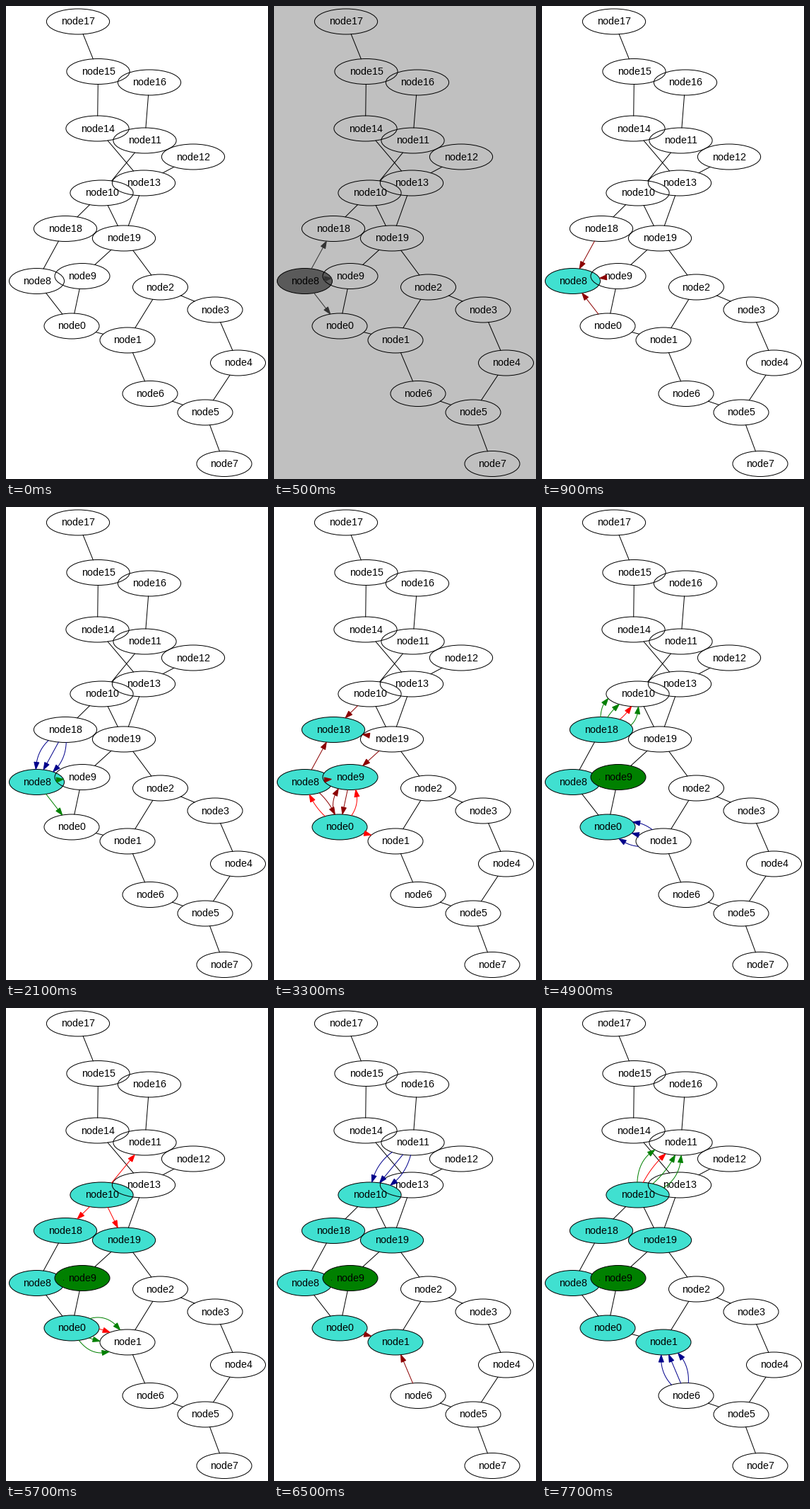
Write a matplotlib script that moves like this. It is 371 by 668 pixels and loops after 8 s.

```python
import numpy as np
import matplotlib.pyplot as plt
from matplotlib.animation import FuncAnimation
from matplotlib.patches import Ellipse, Polygon

W, H, DPI = 371, 668, 100
TICK = 100
PX = 72 / DPI
FAN = 22          # spacing between parallel messages on one link
HEAD, HALF = 10, 3.5

NODES = [(93, 452), (172, 472), (218.5, 397), (296, 429), (328.5, 504),
         (282, 574), (204, 547.5), (309, 646.5), (43.5, 388.5), (108, 381.5),
         (135.5, 264), (196.5, 190), (265, 213), (195, 250), (129.5, 173),
         (130.5, 92.5), (203, 108), (102, 22), (84, 314.5), (167, 328)]
NODES = [np.array(p, float) for p in NODES]
LINKS = [(15, 17), (14, 15), (13, 14), (11, 16), (10, 11), (12, 13), (10, 18),
         (10, 19), (13, 19), (8, 18), (8, 9), (0, 8), (0, 9), (9, 19),
         (18, 19), (2, 19), (1, 2), (2, 3), (3, 4), (4, 5), (5, 6), (5, 7),
         (1, 6), (0, 1)]

TURQUOISE, GREEN, RED = "#40e0d0", "#008000", "#ff0000"
DARKRED, NAVY, SHADE = "#8b0000", "#00008b", "#333333"
REACHED = {8: 2, 9: 7, 18: 7, 0: 8, 10: 13, 19: 14, 1: 15}
FINISHED = {9: 10}


def push(color, node, *others):
    return [(node, other, color) for other in others]


def pull(color, node, *others):
    return [(other, node, color) for other in others]


def burst(src, dst, *colors):
    return [(src, dst, color) for color in colors]


def ask(src, dst):
    return burst(src, dst, NAVY, NAVY, NAVY)


STEPS = [
    [],
    push(SHADE, 8, 18, 9, 0),
    pull(DARKRED, 8, 18, 9, 0),
    ask(18, 8) + ask(0, 8) + pull(NAVY, 8, 9),
    push(RED, 8, 18, 9, 0),
    ask(18, 8) + push(GREEN, 8, 9, 0),
    burst(8, 18, GREEN, RED, GREEN, GREEN) + push(GREEN, 8, 9),
    pull(DARKRED, 9, 8, 0, 19) + pull(DARKRED, 18, 8, 10, 19),
    pull(DARKRED, 9, 8, 0, 19) + pull(DARKRED, 18, 8, 10, 19)
    + push(RED, 0, 8) + pull(DARKRED, 0, 8, 9) + push(RED, 0, 9, 1),
    push(RED, 18, 10, 19) + push(RED, 9, 0, 19),
    ask(10, 18),
    ask(10, 18) + ask(1, 0),
    burst(18, 10, GREEN, GREEN, RED, GREEN) + ask(1, 0),
    pull(DARKRED, 10, 11, 18, 19),
    push(RED, 10, 11, 18, 19) + burst(0, 1, GREEN, GREEN, RED, GREEN),
    pull(DARKRED, 1, 0, 6),
    pull(DARKRED, 1, 0, 6) + ask(11, 10),
    push(RED, 1, 2, 6),
    pull(DARKRED, 19, 13, 2) + push(RED, 1, 6),
    ask(6, 1) + burst(10, 11, GREEN, RED, GREEN, GREEN),
]


def radii(i):
    return np.array([39 if i < 10 else 44.6, 18])


def rim(i, j):
    """Point on the outline of node i facing node j, and its fraction of the way."""
    way = NODES[j] - NODES[i]
    t = 1 / np.hypot(*(way / radii(i)))
    return NODES[i] + t * way, t


def overlapping(i, j):
    return rim(i, j)[1] + rim(j, i)[1] > 1


def route(src, dst, offset=0):
    """Bezier between two node centres, clipped to the outside of both."""
    p, q = NODES[src], NODES[dst]
    way = q - p
    side = np.array([-way[1], way[0]]) / np.hypot(*way)
    if side[0] < 0:
        side = -side
    t = np.linspace(0, 1, 600)[:, None]
    path = p + t * way + 3 * t * (1 - t) * offset * side
    outside = np.ones(len(t), bool)
    for i in (src, dst):
        outside &= np.hypot(*((path - NODES[i]) / radii(i)).T) >= 1
    return path[outside]


def line(path, color, z=30):
    ax.plot(*np.transpose(path), color=color, lw=PX, zorder=z)


def dot(point):
    ax.plot(*point, ".", color="black", ms=1.6 * PX, mew=0, zorder=30)


def arrow(src, dst, offset, color):
    if overlapping(src, dst):
        low, high = sorted((src, dst))
        tip = rim(low, high)[0]
        way = NODES[dst] - NODES[src]
    else:
        path = route(src, dst, offset)
        tip = path[-1]
        shaft = path[np.hypot(*(path - tip).T) >= HEAD]
        way = tip - (shaft[-1] if len(shaft) else path[0])
        line(shaft, color)
    way = way / np.hypot(*way)
    base = tip - HEAD * way
    wing = HALF * np.array([-way[1], way[0]])
    ax.add_patch(Polygon([tip, base + wing, base - wing], fc=color, ec=color,
                         lw=PX, zorder=31))


def draw_node(i, step):
    fill = "none"
    if i in FINISHED and step >= FINISHED[i]:
        fill = GREEN
    elif i in REACHED and step >= REACHED[i]:
        fill = TURQUOISE
    elif i == 8 and step == 1:
        fill = "#5a5a5a"
    x, y = NODES[i]
    ax.add_patch(Ellipse((x, y), *(2 * radii(i)), fc=fill, ec="black",
                         lw=PX, zorder=i + 1))
    ax.text(x, y + 4.5, f"node{i}", ha="center", va="baseline",
            family="Liberation Sans", size=14.3 * PX, zorder=i + 1)


def draw_scene(step):
    ax.clear()
    ax.set(xlim=(0, W), ylim=(H, 0))
    ax.axis("off")
    fig.set_facecolor("#c0c0c0" if step == 1 else "white")
    for i in range(len(NODES)):
        draw_node(i, step)
    for link in LINKS:
        messages = [m for m in STEPS[step] if tuple(sorted(m[:2])) == link]
        for k, (src, dst, color) in enumerate(messages):
            arrow(src, dst, FAN * (k - (len(messages) - 1) / 2), color)
        if not messages:
            if overlapping(*link):
                dot(rim(*link)[0])
            else:
                line(route(*link)[[0, -1]], "black")


def update(frame):
    time = frame * TICK
    draw_scene(0 if time < 500 else 1 + (time - 500) // 400)
    return []


fig = plt.figure(figsize=(W / DPI, H / DPI), dpi=DPI)
ax = fig.add_axes([0, 0, 1, 1])
anim = FuncAnimation(fig, update, frames=8000 // TICK, interval=TICK,
                     init_func=lambda: [], repeat=True, repeat_delay=0)
plt.show()
```
